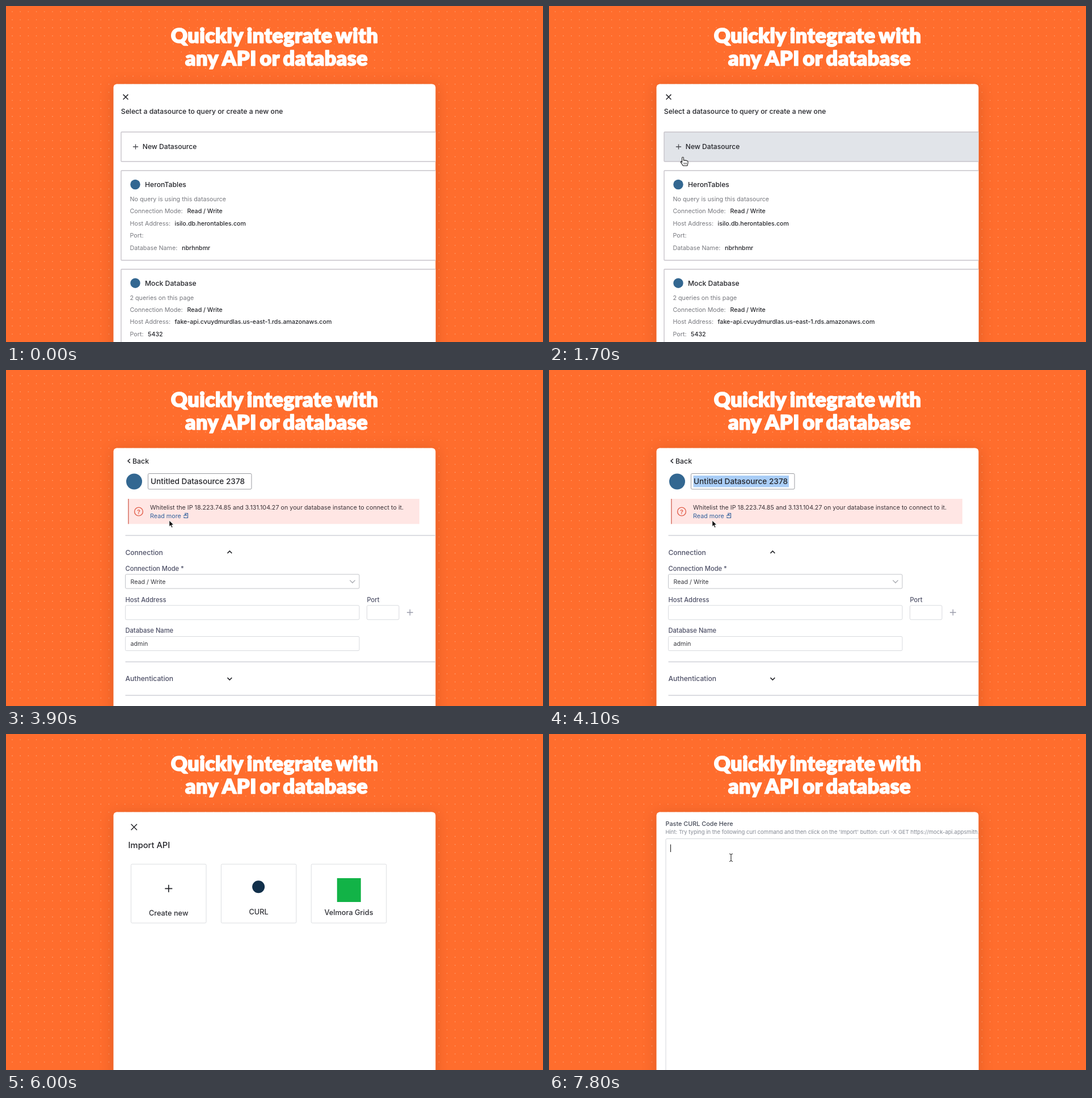
These frames come from a looping animation (947x592 px, 8000 ms). An HTML page with a canvas:

```html
<!DOCTYPE html>
<html lang="en">
<head>
<meta charset="utf-8">
<title>Quickly integrate with any API or database</title>
<style>
  html, body { margin: 0; width: 100%; height: 100%; overflow: hidden; background: #ff6d2d; }
  canvas { display: block; width: 100vw; height: 100vh; }
</style>
</head>
<body>
<canvas id="stage"></canvas>
<script>
const W = 947, H = 592, LOOP = 8000;
const PANEL = { x: 189.5, y: 137.5, w: 568, h: 470 };
const INK = '#25262b', GRAY = '#77787e', SLATE = '#4d4f66', ACCENT = '#ee6a4f', ELEPHANT = '#336791';

const canvas = document.getElementById('stage');
const ctx = canvas.getContext('2d');
const dpr = window.devicePixelRatio || 1;
canvas.width = Math.round(W * dpr);
canvas.height = Math.round(H * dpr);
ctx.scale(dpr, dpr);

function text(str, x, y, size, color = INK, weight = 400, align = 'left') {
  ctx.font = `${weight} ${size}px Inter, "Noto Sans", sans-serif`;
  ctx.textAlign = align;
  ctx.fillStyle = color;
  ctx.fillText(str, x, y);
}

function box(x, y, w, h, stroke, { r = 2, fill = '#fff', line = 1 } = {}) {
  ctx.beginPath();
  ctx.roundRect(x, y, w, h, r);
  if (fill) { ctx.fillStyle = fill; ctx.fill(); }
  if (stroke) { ctx.strokeStyle = stroke; ctx.lineWidth = line; ctx.stroke(); }
}

function lines(points, color = INK, width = 1.5) {
  ctx.beginPath();
  points.forEach(([x, y], i) => i ? ctx.lineTo(x, y) : ctx.moveTo(x, y));
  ctx.strokeStyle = color;
  ctx.lineWidth = width;
  ctx.stroke();
}

function disc(x, y, r, color) {
  ctx.beginPath();
  ctx.arc(x, y, r, 0, 7);
  ctx.fillStyle = color;
  ctx.fill();
}

function square(x, y, r, color) {
  ctx.fillStyle = color;
  ctx.fillRect(x - r, y - r, 2 * r, 2 * r);
}

function plus(x, y, r, color = INK, width = 1.5) {
  lines([[x - r, y], [x + r, y]], color, width);
  lines([[x, y - r], [x, y + r]], color, width);
}

function cross(x, y, r) {
  lines([[x - r, y - r], [x + r, y + r]]);
  lines([[x - r, y + r], [x + r, y - r]]);
}

// (x, y) is the tip; w and h reach to the ends of the arms.
const chevronX = (x, y, w, h, color, width) => lines([[x + w, y - h], [x, y], [x + w, y + h]], color, width);
const chevronY = (x, y, w, h, color, width) => lines([[x - w, y - h], [x, y], [x + w, y - h]], color, width);

function shape(path, x, y, fill, stroke, width) {
  ctx.save();
  ctx.translate(x, y);
  ctx.lineJoin = 'round';
  const p = new Path2D(path);
  ctx.strokeStyle = stroke;
  ctx.lineWidth = width;
  ctx.fillStyle = fill;
  ctx.fill(p);
  ctx.stroke(p);
  ctx.restore();
}

function hand(x, y) {
  shape('M-1.4 9V1.2Q-1.4-.3 0-.3T1.4 1.2V5.6Q2.6 4.4 4 5.8Q5.4 4.8 6.6 6.3Q8.8 5.8 9 8V10.5Q8.6 12.5 7.8 15H.4Q-.8 12.6-3.6 9.2Q-4.4 7.4-2.8 7.2Z',
    x, y, '#fff', '#222', 1.1);
  for (const dx of [2, 4.2, 6.4]) lines([[x + dx, y + 9.5], [x + dx, y + 12.8]], '#222', 0.8);
}

const arrow = (x, y) =>
  shape('M0 0V11L2.5 8.7L4.3 13L6.3 12.1L4.5 8L8 7.8Z', x, y, '#111', '#fff', 0.9);

function ibeam(x, y) {
  lines([[x, y - 6], [x, y + 6]], '#222', 1.1);
  for (const s of [-1, 1]) lines([[x - 3, y + 7 * s], [x, y + 5.5 * s], [x + 3, y + 7 * s]], '#222', 1);
}

function title() {
  ctx.save();
  ctx.font = '900 36px Lato, "Open Sans", sans-serif';
  ctx.letterSpacing = '0.4px';
  ctx.wordSpacing = '-3px';
  ctx.textAlign = 'center';
  ctx.fillStyle = ctx.strokeStyle = '#fff';
  ctx.lineWidth = 1.7;
  ctx.lineJoin = 'round';
  for (const line of [['Quickly integrate with', 473.5, 64.5], ['any API or database', 477, 104.8]]) {
    ctx.fillText(...line);
    ctx.strokeText(...line);
  }
  ctx.restore();
}

function backdrop() {
  ctx.fillStyle = '#ff6d2d';
  ctx.fillRect(0, 0, W, H);
  for (let y = 10; y < H; y += 14.2)
    for (let x = 11; x < W; x += 14.2) disc(x, y, 0.8, 'rgba(255,215,190,.5)');
  title();
  ctx.save();
  ctx.shadowColor = 'rgba(110,30,0,.22)';
  ctx.shadowBlur = 26 * dpr;
  ctx.shadowOffsetY = 4 * dpr;
  box(PANEL.x, PANEL.y, PANEL.w, PANEL.h, null, { r: 6 });
  ctx.restore();
}

function source(y, name, note, rows) {
  box(203, y, 600, 158, '#c8c4ca', { r: 1, line: 1.4 });
  disc(228, y + 24.5, 8.7, ELEPHANT);
  text(name, 245, y + 29, 12.2, INK, 500);
  text(note, 218.5, y + 54, 10.72, GRAY);
  rows.forEach(([label, x, value], i) => {
    const base = y + 75.3 + i * 21.45;
    text(label, 218.5, base, 10.72, GRAY);
    text(value, x, base, 10.65, INK, 500);
  });
}

function sourceList(t) {
  const hover = t >= 1000;
  cross(211, 160.3, 4.4);
  text('Select a datasource to query or create a new one', 202.8, 190, 12.2, INK, 500);
  box(203, 222, 600, 52, '#c8c4ca', { r: 1, line: 1.4, fill: hover ? '#e1e4e9' : '#fff' });
  plus(228.5, 248, 4.6, '#4a4b50', 1.3);
  text('New Datasource', 240.8, 252.4, 12.1, INK, 500);
  source(290, 'HeronTables', 'No query is using this datasource', [
    ['Connection Mode:', 319.5, 'Read / Write'],
    ['Host Address:', 297.5, 'isilo.db.herontables.com'],
    ['Port:', 250, ''],
    ['Database Name:', 310, 'nbrhnbmr'],
  ]);
  source(463.7, 'Mock Database', '2 queries on this page', [
    ['Connection Mode:', 319.5, 'Read / Write'],
    ['Host Address:', 297.5, 'fake-api.cvuydmurdlas.us-east-1.rds.amazonaws.com'],
    ['Port:', 250, '5432'],
  ]);
  if (hover) hand(236, 266.5);
}

const TYPES = [
  ['PostgreSQL', disc, 22, ELEPHANT], ['MongoDB', disc, 18, '#13a050'],
  ['Mysql', disc, 22, '#11708f'], ['ElasticSearch', disc, 21, '#fdbf22'],
  ['ElasticSearch', disc, 21, '#fdbf22'], ['KelvarDB', square, 18, '#2d66b4'],
  ['Redis', disc, 21, '#c8302a'], ['NvSQL', disc, 19, '#c2443f'],
  ['Emberhold', disc, 22, '#fda81e'], ['Duskfold', square, 17, '#2868b2'],
  ['Q7', square, 21, '#d14b38'],
];

function typeGrid() {
  chevronX(221, 163, 4.4, 4.2, INK, 1.7);
  text('Back', 231, 168.2, 14.6, INK, 500);
  text('Select Datasource Type', 216, 198.8, 14.7, INK, 500);
  TYPES.forEach(([name, mark, r, color], i) => {
    const x = 215.5 + (i % 4) * 152.2, y = [233, 356.8, 479][i >> 2];
    box(x, y, 134.5, 105.5, '#d9dbde', { r: 3 });
    mark(x + 67, y + 39.5, r, color);
    text(name, x + 67, y + 82.8, 12.75, '#2f3036', 500, 'center');
  });
  hand(338.6, 290.5);
}

function field(label, x, y, w, value = '', border = '#d8dade') {
  text(label, x, y - 6.3, 11.15, SLATE, 500);
  box(x, y, w, 25, border);
  text(value, x + 9, y + 16.6, 10.7, '#36373d');
}

function settings(t) {
  chevronX(215, 160.3, 3.8, 3.6, INK, 1.5);
  text('Back', 223, 164.7, 12.3, INK, 500);
  disc(226, 196.5, 14, ELEPHANT);
  box(250.5, 182.5, 182.5, 27.5, '#9a9ba0');
  if (t >= 4000) {
    ctx.fillStyle = '#a9cdf6';
    ctx.fillRect(254.5, 186, 168.5, 20.5);
  }
  text('Untitled Datasource 2378', 255, 201.2, 13.65, INK, 500);

  ctx.fillStyle = '#ffe6e4';
  ctx.fillRect(215, 227, 514, 44.3);
  ctx.fillStyle = '#dc8176';
  ctx.fillRect(215, 227, 1.7, 44.3);
  ctx.beginPath();
  ctx.arc(234, 249.5, 7.4, 0, 7);
  ctx.strokeStyle = '#e2604c';
  ctx.lineWidth = 1.4;
  ctx.stroke();
  text('?', 234, 253.6, 11, '#e2604c', 600, 'center');
  text('Whitelist the IP 18.223.74.85 and 3.131.104.27 on your database instance to connect to it.',
    254, 245.5, 10.75, '#3b3338');
  text('Read more', 254, 260.6, 10.75, '#31609c');
  lines([[315, 252.5], [320.5, 252.5], [320.5, 260.5], [314, 260.5], [314, 258.5]], '#31609c', 1.2);
  lines([[313, 257], [317.5, 254.8]], '#31609c', 1.2);
  lines([[314.8, 254.5], [317.7, 254.5], [317.7, 257.4]], '#31609c', 1.2);

  for (const y of [291.5, 514.2, 573.2]) lines([[210.5, y], [760, y]], '#d0d1d8', 1.5);
  text('Connection', 210.5, 325.5, 12.05, SLATE, 500);
  chevronY(394.4, 319, 3.9, -3.9, INK, 1.6);
  field('Connection Mode *', 210.5, 360, 412.5, 'Read / Write', '#c2c3c8');
  chevronY(611, 375, 4.6, 4.6, '#a4a6ad', 1.3);
  field('Host Address', 210.5, 414.8, 412.5);
  field('Port', 636.5, 414.8, 56.5);
  plus(712.4, 427.2, 5.4, '#9b9dab', 1.4);
  field('Database Name', 210.5, 469.5, 412.5, 'admin');
  text('Authentication', 210.5, 548.4, 12.1, SLATE, 500);
  chevronY(394.4, 546, 3.9, 3.9, INK, 1.6);
  arrow(287.8, 265);
}

// Pointer glides in and eases to rest, sampled ten times a second.
function pointerAt(t) {
  const k = Math.min(1, Math.floor((t - 7000) / 100) / 4);
  const e = 1 - (1 - k) ** 2;
  return [262 + 149.5 * e, 204 + 89.5 * e];
}

function importApi(t) {
  const shown = t >= 7000;
  const [px, py] = shown ? pointerAt(t) : [0, 0];
  let over = false;
  cross(225.8, 164, 5.2);
  text('Import API', 215.6, 201.2, 14.7, INK, 500);
  ['Create new', 'CURL', 'Velmora Grids'].forEach((name, i) => {
    const x = 220.5 + i * 158.9, y = 229.3;
    const hit = shown && px > x && px < x + 132.5 && py > y && py < y + 103.7;
    over = over || hit;
    box(x, y, 132.5, 103.7, hit ? ACCENT : '#dcdee1', { line: hit ? 1.3 : 1 });
    text(name, x + 66.2, [320, 318.2, 318.9][i], 12.75, '#2f3036', 500, 'center');
  });
  plus(286.8, 272.3, 6.5, INK, 1.7);
  disc(445.2, 269.3, 11, '#12304b');
  square(604.8, 275, 21, '#12b347');
  if (shown) (over ? hand : arrow)(px, py);
}

function pasteCode() {
  text('Paste CURL Code Here', 205.5, 161.8, 10.85, '#454a57', 500);
  text("Hint: Try typing in the following curl command and then click on the 'Import' button: curl -X GET https://mock-api.appsmith.com/users",
    205.5, 175.5, 9.5, '#858a94');
  box(206, 184.5, 600, 500, '#d3d6da');
  lines([[214.5, 194.5], [214.5, 208]], '#222', 1.1);
  ibeam(321, 217.8);
}

const SCENES = [[7700, pasteCode], [6000, importApi], [3900, settings], [1900, typeGrid], [0, sourceList]];

function draw(now) {
  const t = now % LOOP;
  backdrop();
  ctx.save();
  ctx.beginPath();
  ctx.roundRect(PANEL.x, PANEL.y, PANEL.w, PANEL.h, 6);
  ctx.clip();
  SCENES.find(([start]) => t >= start)[1](t);
  ctx.restore();
}

let start;
function tick(now) {
  start ??= now;
  draw(now - start);
  requestAnimationFrame(tick);
}
draw(0);
requestAnimationFrame(tick);
</script>
</body>
</html>
```
